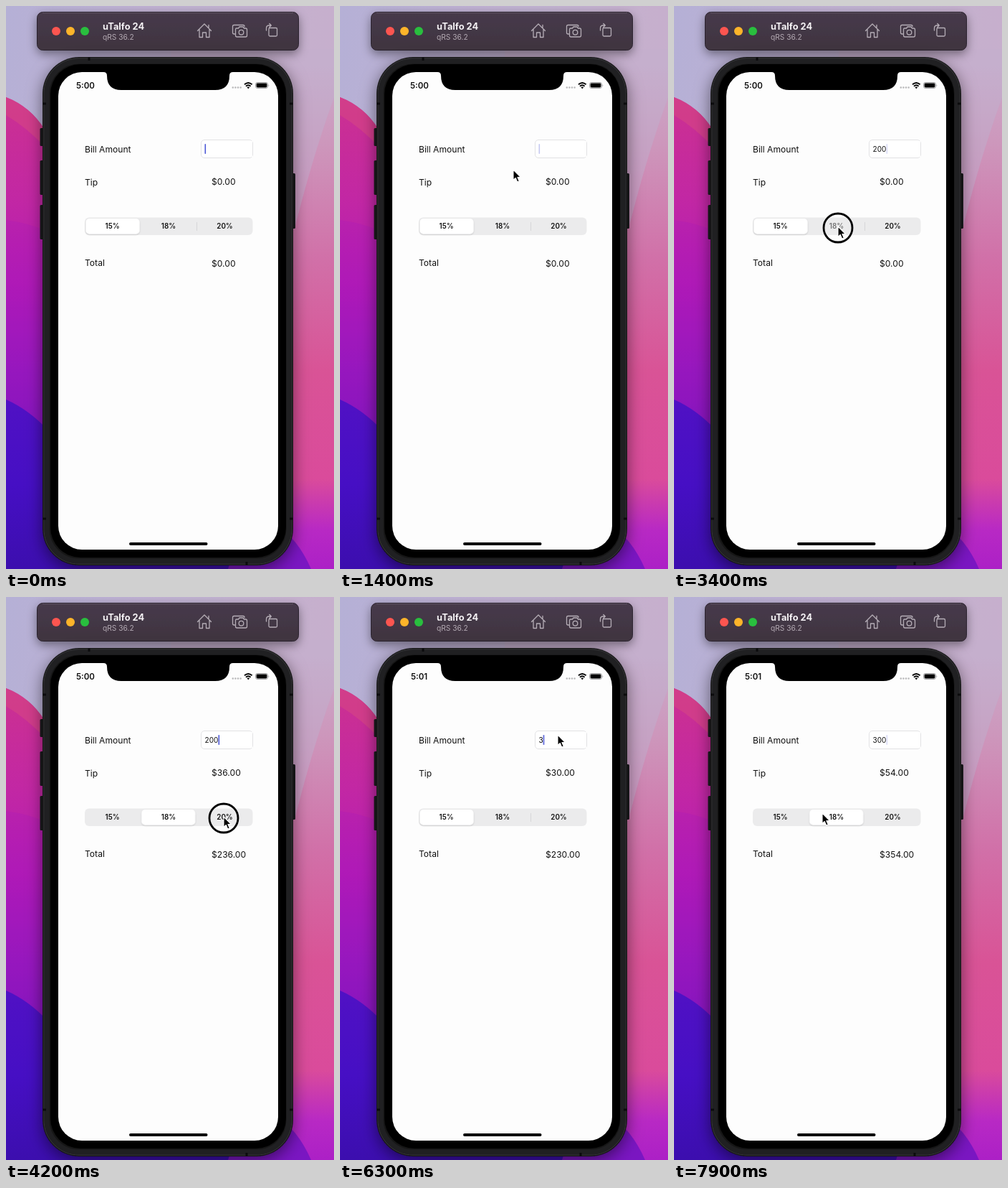
These frames come from a looping animation (458 px wide and 784 px high, 8000 ms). An HTML page:

```html
<!DOCTYPE html>
<html lang="en">
<head>
<meta charset="utf-8">
<title>Tip calculator</title>
<style>
html, body { margin: 0; width: 100%; height: 100%; overflow: hidden; }
#stage { display: block; width: 458px; height: 784px; font-family: Inter, "Liberation Sans", sans-serif; }
.label { font-size: 12.1px; fill: #111; }
.entry { font-size: 10px; fill: #111; }
.seg { font-size: 9.8px; font-weight: 600; text-anchor: middle; fill: #111; }
.clock { font-size: 11.5px; font-weight: 600; fill: #111; }
.icon { fill: none; stroke: #b5adb6; stroke-width: 1.3; stroke-linejoin: round; stroke-linecap: round; }

/* Everything shares one 8 s loop; "step" parts switch hard. */
.move { animation: 8s ease-in-out infinite; }
.step { animation: 8s step-end infinite; }
#cursor { animation-name: cursor; }
#pill { animation-name: pill; }
#caret { animation: caret 8s linear infinite; }
#bar { animation: bar 8s linear infinite; }
#ring { animation-name: ring; }
#sepLeft { animation-name: sep-left; }
#sepRight { animation-name: sep-right; }
#mid { animation-name: mid; }
#typed { animation-name: typed; }
#two { animation-name: two; }
#three { animation-name: three; }
.reel { animation-name: reel; }
#time { animation-name: time; }

@keyframes cursor {
  0%, 9.5% { transform: translate(-18px, 388px); animation-timing-function: ease-in; }
  11.25% { transform: translate(-1px, 366px); animation-timing-function: ease-out; }
  20.5% { transform: translate(284px, 204px); }
  24%, 36.25% { transform: translate(290px, 200px); }
  40.6%, 45.6% { transform: translate(229px, 307px); }
  50%, 53.1% { transform: translate(304px, 306px); }
  56.9%, 59.4% { transform: translate(149px, 306px); }
  64.4%, 86.25% { transform: translate(304px, 192px); }
  91.25% { transform: translate(209px, 303px); }
  96%, 100% { transform: translate(207px, 301px); }
}
@keyframes ring {
  0%, 28.75%, 43.75%, 52.9%, 59%, 68.1%, 94.4% { opacity: 0; }
  26.9%, 41.9%, 51%, 57.5%, 66.25%, 92.5% { opacity: 1; }
}
@keyframes pill {
  0%, 43.75% { transform: translateX(0); }
  47%, 52.9% { transform: translateX(77.7px); }
  56.1%, 59% { transform: translateX(155.5px); }
  62.5%, 94.4% { transform: translateX(0); }
  97.6%, 100% { transform: translateX(77.7px); }
}
@keyframes sep-left {
  0%, 59% { opacity: 0; }
  54.5% { opacity: 1; }
}
@keyframes sep-right {
  0%, 61% { opacity: 1; }
  45%, 95.5% { opacity: 0; }
}
@keyframes mid {
  0%, 43.75%, 94.4% { opacity: 1; }
  41.9%, 92.5% { opacity: .55; }
}
@keyframes typed {
  0%, 73.1% { transform: translateX(0); }
  30.6%, 71.25%, 76.25% { transform: translateX(6.2px); }
  32.5%, 68.75%, 81.25% { transform: translateX(12.5px); }
  34.4%, 83.75% { transform: translateX(19px); }
}
@keyframes two { 0% { opacity: 1; } 73.1%, 100% { opacity: 0; } }
@keyframes three { 0% { opacity: 0; } 73.1%, 100% { opacity: 1; } }
@keyframes reel {
  0% { transform: translateY(0); }
  43.75% { transform: translateY(-20px); }
  52.9% { transform: translateY(-40px); }
  59% { transform: translateY(-60px); }
  94.4%, 100% { transform: translateY(-80px); }
}
@keyframes time { 0% { transform: translateY(0); } 54%, 100% { transform: translateY(-20px); } }
@keyframes caret {
  0%, 4%, 9.5%, 16.5%, 22%, 41.25%, 48.5%, 54%, 59.5%, 84%, 89.5%, 97.5% { opacity: 1; }
  42.5%, 98.75% { opacity: .22; }
  5.5%, 8%, 18%, 20.5%, 43.5%, 47%, 55.5%, 58%, 85.5%, 88%, 100% { opacity: 0; }
}
@keyframes bar {
  0%, 23%, 27.5%, 100% { opacity: 1; }
  24.5%, 26% { opacity: .65; }
}
</style>
</head>
<body>
<svg id="stage" viewBox="0 0 458 784">
  <defs>
    <linearGradient id="sky" x2="1" y2=".25">
      <stop stop-color="#b5b0d6"/><stop offset=".6" stop-color="#c4b1d0"/><stop offset="1" stop-color="#cfabc9"/>
    </linearGradient>
    <linearGradient id="side" x2="0" y2="784" gradientUnits="userSpaceOnUse">
      <stop offset=".1" stop-color="#cbaccb"/><stop offset=".25" stop-color="#cd96bb"/>
      <stop offset=".45" stop-color="#d170a8"/><stop offset=".65" stop-color="#d95396"/>
      <stop offset=".84" stop-color="#da4b9b"/><stop offset=".93" stop-color="#b829c4"/><stop offset="1" stop-color="#ac20c6"/>
    </linearGradient>
    <linearGradient id="hill" x2="0" y1="127" y2="600" gradientUnits="userSpaceOnUse">
      <stop stop-color="#cc3190"/><stop offset=".3" stop-color="#c227a4"/>
      <stop offset=".55" stop-color="#b31bb5"/><stop offset=".8" stop-color="#9618bd"/><stop offset="1" stop-color="#8015bd"/>
    </linearGradient>
    <linearGradient id="deep" x2="0" y2="1">
      <stop stop-color="#5011c4"/><stop offset=".5" stop-color="#460fc4"/><stop offset="1" stop-color="#3c0eae"/>
    </linearGradient>
    <linearGradient id="panel" x2="0" y2="1">
      <stop stop-color="#463a4b"/><stop offset="1" stop-color="#40343f"/>
    </linearGradient>
    <filter id="shade" x="-20%" y="-20%" width="140%" height="140%">
      <feDropShadow dx="0" dy="6" stdDeviation="11" flood-opacity=".5"/>
    </filter>
    <filter id="soft" x="-20%" y="-40%" width="140%" height="200%">
      <feDropShadow dx="0" dy="1" stdDeviation="1.3" flood-opacity=".17"/>
    </filter>
    <filter id="panelShade" x="-15%" y="-60%" width="130%" height="260%">
      <feDropShadow dx="0" dy="5" stdDeviation="7" flood-opacity=".42"/>
    </filter>
  </defs>

  <!-- wallpaper -->
  <rect width="458" height="784" fill="url(#sky)"/>
  <path d="M230 60H458V784H230Z" fill="url(#side)"/>
  <path d="M230 0H458V128C437 185 418 250 403 310H230Z" fill="#bcb4cf" opacity=".42"/>
  <path d="M0 127Q34 140 54 172L240 420V784H0Z" fill="url(#hill)"/>
  <path d="M0 127Q34 140 54 172V196Q30 170 0 152Z" fill="#d44089" opacity=".8"/>
  <path d="M0 298Q30 302 60 314V600H0Z" fill="#9a14c0" opacity=".18"/>
  <path d="M0 548Q32 562 60 592L240 700L320 784H0Z" fill="url(#deep)"/>
  <path d="M310 784L330 720L392 734Q412 752 426 784Z" fill="#7a16c2"/>

  <!-- simulator window bar -->
  <rect x="43.5" y="8.5" width="365" height="53" rx="8" fill="url(#panel)" stroke="#2b222e" filter="url(#panelShade)"/>
  <path d="M51 9.5H401" stroke="#6a5d6e" stroke-width=".8"/>
  <circle cx="70" cy="35" r="6" fill="#fc5550"/>
  <circle cx="90" cy="35" r="6" fill="#fdb42a"/>
  <circle cx="110" cy="35" r="6" fill="#29bf3e"/>
  <text x="135" y="33" font-size="12.8" font-weight="700" fill="#f5f2f5">uTalfo 24</text>
  <text x="135" y="47" font-size="10.2" fill="#b3aab3">qRS 36.2</text>
  <g class="icon">
    <path d="M267.5 34.5L277 25L286.500 34.500M270 33V43.500H274.500V37H279.500V43.500H284V33M283 30V26.500"/>
    <path d="M319.500 39H318.500Q316.500 39 316.500 37V28.500Q316.500 26.500 318.500 26.500H331Q333 26.500 333 28.500"/>
    <path d="M322 31H324.500L326 29H331L332.500 31H334.500Q336.500 31 336.500 33V41Q336.500 43 334.500 43H322.500Q320.500 43 320.500 41V32.500Q320.500 31 322 31Z"/>
    <circle cx="328.500" cy="36.700" r="3.300"/>
    <rect x="367" y="30.500" width="11.500" height="11.500" rx="1.500"/>
    <path d="M363.500 34V31Q363.500 27 367.500 27H370M367.800 24.500L370.300 27L367.800 29.500"/>
  </g>

  <!-- phone -->
  <g fill="#1b1b1d">
    <rect x="47.500" y="170" width="6" height="25" rx="1.500"/>
    <rect x="47.500" y="215" width="6" height="48" rx="1.500"/>
    <rect x="47.500" y="277" width="6" height="48" rx="1.500"/>
    <rect x="398" y="233" width="6" height="77" rx="1.500"/>
  </g>
  <rect x="51" y="71" width="350" height="708" rx="51" fill="#161618" filter="url(#shade)"/>
  <rect x="53" y="73" width="346" height="704" rx="49" fill="none" stroke="#343437" stroke-width="1.300"/>
  <rect x="57" y="77" width="338" height="696" rx="45" fill="none" stroke="#202022" stroke-width="7"/>
  <path d="M116 71.500V76M336 774V778.500M51.500 136H56M396 136H400.500M51.500 714H56M396 714H400.500" stroke="#0b0b0c" stroke-width="3"/>
  <rect x="62" y="81" width="329" height="687" rx="42" fill="#000"/>
  <rect x="73" y="92" width="307" height="665" rx="33" fill="#fdfdfd"/>
  <path d="M136 91V92Q141 92 141 97Q141 117 161 117H292Q312 117 312 97Q312 92 317 92V91Z"/>

  <!-- status bar -->
  <svg x="90" y="102" width="46" height="17">
    <g id="time" class="step clock"><text x="8" y="13">5:00</text><text x="9" y="33">5:01</text></g>
  </svg>
  <path d="M316.800 113.500H330" stroke="#b9b9bb" stroke-width="2.600" stroke-linecap="round" stroke-dasharray="0 3.600"/>
  <g fill="none" stroke="#000" stroke-width="1.900">
    <path d="M333 109.300Q338.300 104.600 343.600 109.300"/>
    <path d="M335 111.700Q338.300 109 341.600 111.700"/>
  </g>
  <path d="M336.400 113.300Q338.300 111.900 340.200 113.300L338.300 115.300Z"/>
  <rect x="348.500" y="106.500" width="17" height="8" rx="2.400" fill="none" stroke="#9a9a9c" stroke-width=".9"/>
  <rect x="349.600" y="107.600" width="14.800" height="5.800" rx="1.400"/>
  <path d="M366.700 109V112.200Q368 110.600 366.700 109Z" fill="#8a8a8c"/>

  <!-- form -->
  <g class="label">
    <text x="110" y="203.500">Bill Amount</text>
    <text x="110" y="249.500">Tip</text>
    <text x="110" y="361.500">Total</text>
  </g>
  <rect x="272.500" y="186.500" width="72" height="25" rx="4.500" fill="#fff" stroke="#e2e2e4"/>
  <svg x="273" y="188" width="71" height="22">
    <g class="entry">
      <text id="two" class="step" x="4.600" y="14.600">200</text>
      <text id="three" class="step" x="4.600" y="14.600">300</text>
    </g>
    <g id="typed" class="step">
      <rect x="4.500" width="70" height="22" fill="#fff"/>
      <rect id="caret" x="4.500" y="4" width="1.600" height="14" rx=".8" fill="#4b57d6"/>
    </g>
  </svg>
  <svg x="280" y="235" width="70" height="20">
    <g class="reel step label">
      <text x="7" y="14">$0.00</text><text x="7" y="34">$36.00</text><text x="7" y="54">$40.00</text>
      <text x="7" y="74">$30.00</text><text x="7" y="94">$54.00</text>
    </g>
  </svg>
  <svg x="280" y="348" width="70" height="20">
    <g class="reel step label">
      <text x="7" y="14.500">$0.00</text><text x="7" y="34.500">$236.00</text><text x="7" y="54.500">$240.00</text>
      <text x="7" y="74.500">$230.00</text><text x="7" y="94.500">$354.00</text>
    </g>
  </svg>

  <!-- segmented control -->
  <rect x="110" y="294.500" width="234.500" height="24.500" rx="6" fill="#ebebec"/>
  <path id="sepLeft" class="step" d="M188.500 301V313" stroke="#d6d6d9"/>
  <path id="sepRight" class="step" d="M266.500 301V313" stroke="#d6d6d9"/>
  <g id="pill" class="move"><rect x="111.500" y="296" width="75" height="21.500" rx="5" fill="#fff" filter="url(#soft)"/></g>
  <g class="seg">
    <text x="148.500" y="310.200">15%</text>
    <text id="mid" class="step" x="227" y="310.200">18%</text>
    <text x="305.500" y="310.200">20%</text>
  </g>

  <rect id="bar" x="172" y="747" width="109.500" height="4" rx="2"/>

  <!-- pointer -->
  <g id="cursor" class="move">
    <circle id="ring" class="step" cy="2" r="20" fill="none" stroke="#000" stroke-width="2.800"/>
    <path d="M0 0V14.500L3.300 11.500L5.600 17L8.200 15.900L5.900 10.600H10.400Z" stroke="#fff" stroke-width="1.100" stroke-linejoin="round"/>
  </g>
</svg>
</body>
</html>
```
